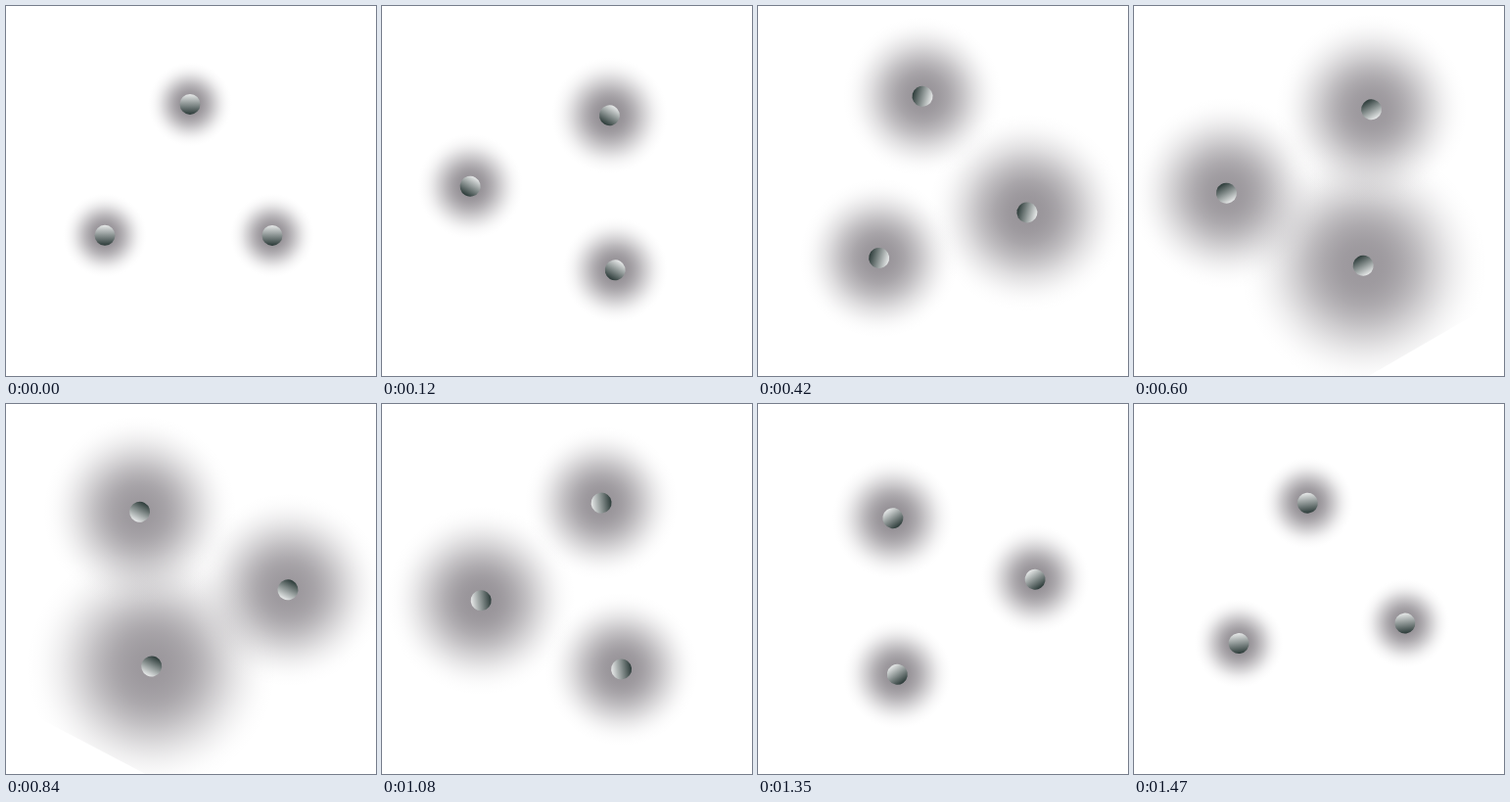
Animation of 378 by 378 pixels, one loop 1.5 s. Source, as an HTML page with a canvas:

```html
<!DOCTYPE html>
<html lang="en">
<head>
<meta charset="utf-8">
<title>Orbiting balls</title>
<style>
  html, body { margin: 0; width: 100%; height: 100%; overflow: hidden; background: #fff; }
  canvas { display: block; width: 378px; height: 378px; }
</style>
</head>
<body>
<canvas id="stage" width="378" height="378"></canvas>
<script>
const ctx = document.getElementById('stage').getContext('2d');
const SIZE = 378, HALF = SIZE / 2;
const LOOP = 1500, STEP = 30, TURN = 720;
const BALL_R = 10.5, GLOW_R = 46;

// Positions relative to the centre; grow is the extra glow radius at the peak.
const balls = [
  { x: -1, y: -88.6, grow: 106 },
  { x: -88, y: 45.3, grow: 70 },
  { x: 83, y: 45.4, grow: 70 }
];

const falloff = u => 1 - u * u * u * (u * (6 * u - 15) + 10);

function disc(x, y, r, fill) {
  ctx.fillStyle = fill;
  ctx.beginPath();
  ctx.arc(x, y, r, 0, 2 * Math.PI);
  ctx.fill();
}

function glow(x, y, r, alpha) {
  const g = ctx.createRadialGradient(x, y, 0, x, y, r);
  for (let i = 0; i <= 20; i++) {
    const u = i / 20;
    g.addColorStop(u, `rgba(50, 42, 52, ${(alpha * falloff(u)).toFixed(4)})`);
  }
  disc(x, y, r, g);
}

function ball(x, y) {
  const g = ctx.createLinearGradient(0, y - BALL_R, 0, y + BALL_R);
  g.addColorStop(0, '#e8eaea');
  g.addColorStop(1, '#2b3a38');
  disc(x, y, BALL_R, g);
}

function draw(t) {
  // Half a turn while the glow grows, a slightly slower half while it shrinks.
  const rising = t < TURN;
  const part = rising ? t / TURN : (t - TURN) / (LOOP - TURN);
  const swell = rising ? part : 1 - part;
  const angle = Math.PI * (rising ? part : 1 + part);

  ctx.fillStyle = '#fff';
  ctx.fillRect(0, 0, SIZE, SIZE);
  ctx.save();
  ctx.translate(HALF, HALF);
  ctx.rotate(angle);
  // The rotating layer cuts the largest glow at its edge.
  ctx.beginPath();
  ctx.rect(-HALF, -HALF, SIZE, SIZE);
  ctx.clip();
  for (const b of balls) glow(b.x, b.y, GLOW_R + b.grow * swell, 0.54 - 0.07 * swell);
  for (const b of balls) ball(b.x, b.y);
  ctx.restore();
}

const start = performance.now();
function tick() {
  const t = Math.max(0, performance.now() - start) % LOOP;
  draw(Math.floor(t / STEP) * STEP);
  requestAnimationFrame(tick);
}
tick();
</script>
</body>
</html>
```
